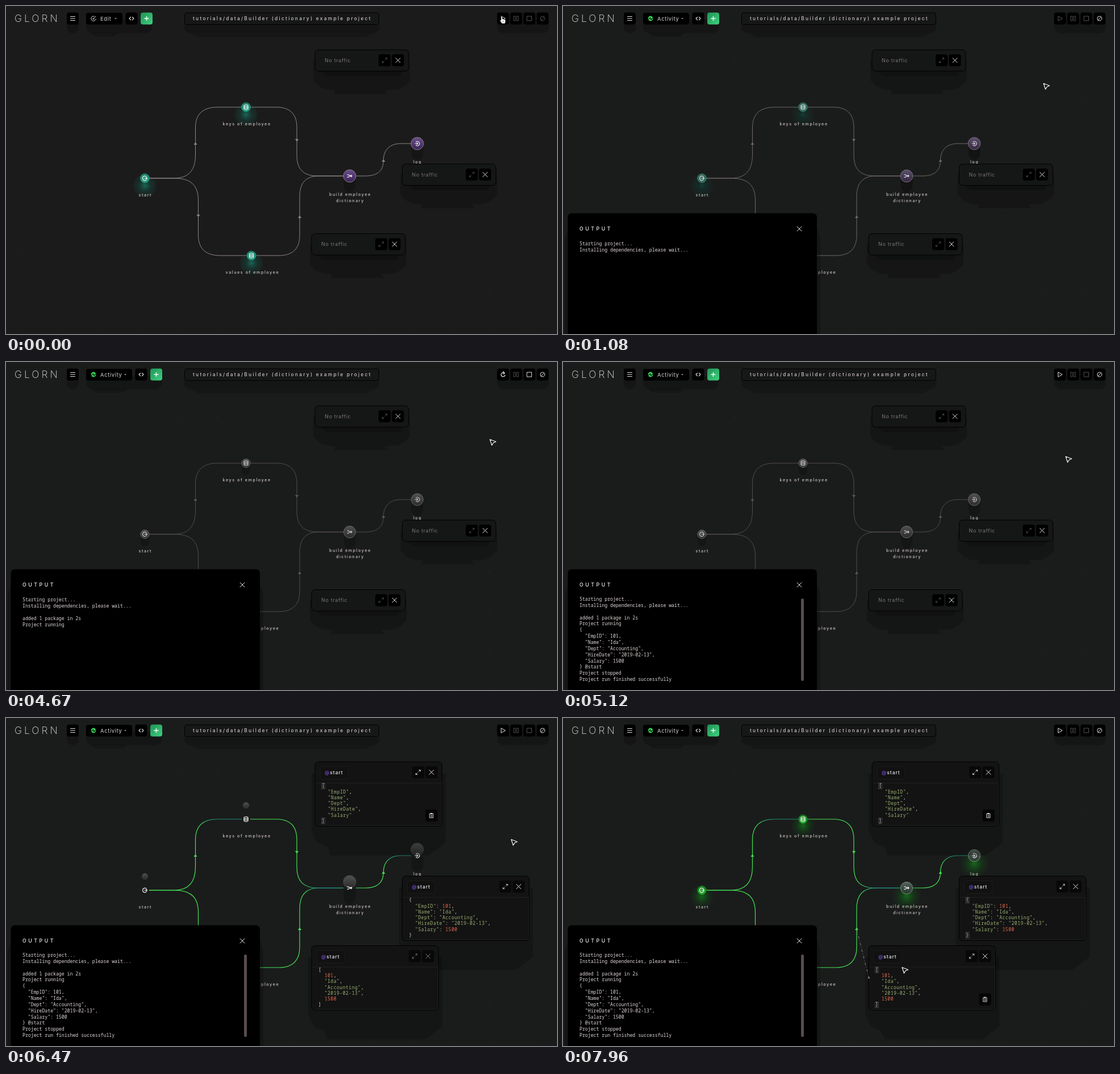
Animation of 970x577 px, one loop 8 s. Source, as an HTML page:

```html
<!DOCTYPE html>
<html lang="en">
<head>
<meta charset="utf-8">
<title>Dictionary builder</title>
<style>
  html, body { margin: 0; width: 100%; height: 100%; overflow: hidden; background: #1b1b1b; }
  svg { display: block; width: 970px; height: 577px; }
  text { font-family: Inter, "Open Sans", sans-serif; white-space: pre; }
  .logo { font-size: 17.5px; font-weight: 200; letter-spacing: 4px; fill: #e6e6e6; }
  .title { font-size: 8.4px; letter-spacing: 2.27px; fill: #d2c8c8; font-weight: 500; }
  .mode { font-size: 9.5px; letter-spacing: .6px; fill: #d6d0d0; }
  .label { font-size: 7.2px; letter-spacing: 1.55px; fill: #cdc4c4; font-weight: 500; }
  .empty { font-size: 8.8px; letter-spacing: .75px; fill: #7d7777; }
  .head { font-size: 8.8px; letter-spacing: 3.5px; fill: #eee; font-weight: 500; }
  .tag { font-size: 8.4px; letter-spacing: 1px; fill: #eee; font-weight: 500; }
  .mono { font: 8.2px "Noto Sans Mono", "DejaVu Sans Mono", monospace; fill: #e2d8d8; }
  .json { font-size: 8px; letter-spacing: .53px; fill: #ddd; }
  .str { fill: #9db274; }
  .num { fill: #e56c4c; }
  .at { fill: #7a50e0; }
  .line { fill: none; stroke: currentColor; stroke-linecap: round; stroke-linejoin: round; }
</style>
</head>
<body>
<svg id="stage" viewBox="0 0 970 577">
  <defs>
    <linearGradient id="plus" x1="0" y1="0" x2="1" y2="1"><stop stop-color="#1f9454"/><stop offset="1" stop-color="#3fd181"/></linearGradient>
    <linearGradient id="flow"><stop offset=".5" stop-color="#45e255"/><stop offset=".72" stop-color="#23897c"/></linearGradient>
    <linearGradient id="teal" x2="0" y2="1"><stop stop-color="#1c7f69"/><stop offset="1" stop-color="#25a583"/></linearGradient>
    <linearGradient id="purple" x2="0" y2="1"><stop stop-color="#69508a"/><stop offset="1" stop-color="#3b2356"/></linearGradient>
    <linearGradient id="gray" x2="0" y2="1"><stop stop-color="#505050"/><stop offset="1" stop-color="#2b2b2b"/></linearGradient>
    <linearGradient id="green" x2="0" y2="1"><stop stop-color="#137a1c"/><stop offset="1" stop-color="#22b52c"/></linearGradient>
    <linearGradient id="mist" x2="0" y2="1"><stop stop-color="#55605a"/><stop offset="1" stop-color="#28382e"/></linearGradient>
    <radialGradient id="tealGlow"><stop stop-color="#16806c" stop-opacity=".75"/><stop offset=".55" stop-color="#14604f" stop-opacity=".3"/><stop offset="1" stop-color="#14604f" stop-opacity=".12"/></radialGradient>
    <radialGradient id="greenGlow"><stop stop-color="#12801a" stop-opacity=".75"/><stop offset=".55" stop-color="#125a18" stop-opacity=".3"/><stop offset="1" stop-color="#124a16" stop-opacity="0"/></radialGradient>
  </defs>
</svg>
<script>
const LOOP = 8000;
// Moments at which the interface changes state
const RUN = 1080, IDLE = 1220, READY = 4670, DATA = 4820, STOPPED = 5120,
      LIVE = 6470, SETTLED = 6620, HOVER_LOG = 7210, HOVER_VALUES = 7360;
const BRIGHT = '#e4dede', DIM = '#565252';

const during = (from, to, content) => `<g data-from="${from}" data-to="${to}">${content}</g>`;
const at = (x, y, content, extra = '') => `<g transform="translate(${x} ${y})" ${extra}>${content}</g>`;
const text = (cls, x, y, content) => `<text class="${cls}" x="${x}" y="${y}">${content}</text>`;
const box = (x, y, w, h, fill, r = 4, stroke = 'none') =>
  `<rect x="${x}" y="${y}" width="${w}" height="${h}" rx="${r}" fill="${fill}" stroke="${stroke}"/>`;
const line = (d, width = 1) => `<path class="line" d="${d}" stroke-width="${width}"/>`;
const shade = (points, alpha = .23) => `<polygon points="${points}" fill="#000" opacity="${alpha}"/>`;

const icons = {
  menu: line('M-4 -3.5H4M-4 0H4M-4 3.5H4'),
  edit: line('M1 -4A4.2 4.2 0 1 0 4.2 1M-1 1L4 -4M-1 1H1.5'),
  activity: '<circle r="4.4" fill="#37d356"/><path d="M-4.5 1H-2L-.6 -2L1 2.4L2.2 0H4.5" fill="none" stroke="#000"/>',
  caret: '<path d="M-2 -1H2L0 1.4Z" fill="currentColor"/>',
  code: line('M-1.5 -2.5L-4 0L-1.5 2.5M1.5 -2.5L4 0L1.5 2.5', 1.2),
  plus: line('M-3.5 0H3.5M0 -3.5V3.5', 1.3),
  play: line('M-3 -4L4 0L-3 4Z'),
  pause: line('M-4 -4H-1.3V4H-4ZM1.3 -4H4V4H1.3Z', .9),
  stop: line('M-4 -4H4V4H-4Z'),
  ban: line('M4 0A4 4 0 1 1 -4 0A4 4 0 1 1 4 0M-2.8 2.8L2.8 -2.8'),
  restart: line('M2.8 -2A3.5 3.5 0 1 0 3.5 1M0 -5L2.8 -2.5L0 -.8', 1.2),
  expand: line('M1 -1L4 -4M1.6 -4H4V-1.6M-1 1L-4 4M-1.6 4H-4V1.6', .9),
  close: line('M-4 -4L4 4M4 -4L-4 4'),
  clipboard: line('M-3 -3H3V4H-3ZM-1.3 -4H1.3V-2.5H-1.3ZM-1.3 0H1.3M-1.3 2H1.3', .9),
  out: line('M2.6 -2.6A3.8 3.8 0 1 0 2.6 2.6M-.8 0H4M2.4 -1.6L4 0L2.4 1.6', 1.2),
  into: line('M-2.2 -3A3.8 3.8 0 1 1 -2.2 3M-4 0H1M-.6 -1.6L1 0L-.6 1.6', 1.1),
  merge: line('M-4 -2.4C-1 -2.4 -2 0 4 0M-4 2.4C-1 2.4 -2 0 4 0M2.4 -1.6L4 0L2.4 1.6', 1.1),
  store: line('M-3.6 -2.6A3.6 1.5 0 1 1 3.6 -2.6A3.6 1.5 0 1 1 -3.6 -2.6V2.6A3.6 1.5 0 0 0 3.6 2.6V-2.6M-3.6 0A3.6 1.5 0 0 0 3.6 0', 1.1),
};
const icon = (name, x, y, color = BRIGHT) => at(x, y, icons[name], `color="${color}"`);
const button = (name, x, y, color, fill = '#000') =>
  box(x - 10.5, y - 10.5, 21, 21, fill) + icon(name, x, y, color);

// Backdrop and grid
function backdrop() {
  let dots = '';
  for (let x = 29; x < 970; x += 68.45)
    for (let y = 97; y < 577; y += 68.2) dots += `<circle cx="${x}" cy="${y}" r="1"/>`;
  return box(0, 0, 970, 577, '#1b1b1b', 0) + during(RUN, LOOP, box(0, 0, 970, 577, '#1a1c1b', 0)) +
    `<g fill="#262626">${dots}</g>`;
}

// Connections, each with the position and direction of its arrow
const links = [
  ['M252 303H296C322 303 333.5 288 333.5 262V214C333.5 190 347 178 372 178H415', 333.5, 242, 1],
  ['M252 303H296C324 303 338.5 314 338.5 342V403C338.5 427 352 439 377 439H425', 338.5, 369, -1],
  ['M430 178H476C500 178 512 190 512 214V262C512 287 523 299 549 299H594', 512, 236, -1],
  ['M440 439H480C505 439 517 427 517 403V335C517 311 528 299 551 299H594', 517, 371, 1],
  ['M616 299H632C654 299 664.5 290 664.5 271C664.5 254 675 242 695 242H713', 664.5, 272, 1],
];
const network = (stroke, arrow, width = 1) => links.map(([d, x, y, up]) =>
  `<path d="${d}" fill="none" stroke="${stroke}" stroke-width="${width}"/>` +
  `<path d="M${x - 3} ${y + 2 * up}h6l-3 ${-4.5 * up}Z" fill="${arrow}"/>`).join('');

const nodes = [
  { x: 244.5, y: 303, r: 8, icon: 'out' },
  { x: 422.5, y: 178, r: 8, icon: 'store' },
  { x: 432, y: 439, r: 8, icon: 'store' },
  { x: 605, y: 299, r: 11, icon: 'merge' },
  { x: 724, y: 242, r: 11, icon: 'into' },
];
const ball = (r, fill, stroke) => `<circle r="${r}" fill="url(#${fill})" stroke="${stroke}"/>`;
const glow = (id, y, r) => `<circle cy="${y}" r="${r}" fill="url(#${id})"/>`;
const dropShade = r => shade(`${-r},2 ${r},2 ${r * .9},${r * 2} ${r * .4},${r * 2.6} ${-r * .4},${r * 2.6} ${-r * .9},${r * 2}`, .2);
const looks = {
  colour: n => n.r < 10
    ? glow('tealGlow', 13, 20) + ball(n.r, 'teal', '#26806c')
    : dropShade(n.r) + ball(n.r, 'purple', '#8b7d93'),
  gray: n => dropShade(n.r) + ball(n.r - .5, 'gray', '#666'),
  lifted: n => n.r < 10
    ? at(0, -24.5, ball(5, 'gray', '#444'))
    : dropShade(n.r) + at(0, -11, ball(n.r, 'gray', '#4c4c4c')),
  green: n => n.r < 10
    ? glow('greenGlow', 11, 22) + ball(n.r - .5, 'green', '#1c8a26')
    : glow('greenGlow', 14, 27) + ball(n.r - .5, 'mist', '#7d8a82'),
};
const nodeSet = look => nodes.map(n =>
  at(n.x, n.y, looks[look](n) + icon(n.icon, 0, 0, look === 'gray' ? '#c8c4c4' : '#f2f2f2'))).join('');

function graph() {
  const labels = [[233.5, 334.5, 'start'], [381.5, 209.5, 'keys of employee'], [386.5, 471, 'values of employee'],
    [569, 334, 'build employee'], [581, 344.5, 'dictionary'], [717, 277, 'log']];
  return during(0, RUN, network('#918686', '#918686') + nodeSet('colour')) +
    during(RUN, IDLE, network('#706969', '#706969') + nodeSet('gray') + `<g opacity=".5">${nodeSet('colour')}</g>`) +
    during(IDLE, LIVE, network('#514d4d', '#5c5757') + nodeSet('gray')) +
    during(LIVE, LOOP, network('url(#flow)', '#45e255', 1.2)) +
    during(LIVE, SETTLED, nodeSet('lifted')) + during(SETTLED, LOOP, nodeSet('green')) +
    labels.map(l => text('label', ...l)).join('');
}

// Traffic panels
const record = ['"EmpID": 101,', '"Name": "Ida",', '"Dept": "Accounting",', '"HireDate": "2019-02-13",', '"Salary": 1500'];
const panels = [
  { x: 544, y: 77, open: '[', close: ']', framed: LIVE, body: ['"EmpID",', '"Name",', '"Dept",', '"HireDate",', '"Salary"'] },
  { x: 697.5, y: 278, open: '{', close: '}', framed: SETTLED, body: record },
  { x: 538, y: 400.5, open: '[', close: ']', framed: SETTLED, body: record.map(l => l.split(': ')[1]) },
];
const colourise = s => s.replace(/("[^"]*")|(\d+)/g, (m, str) => `<tspan class="${str ? 'str' : 'num'}">${m}</tspan>`);

const emptyPanel = p => at(p.x, p.y,
  shade('-3,18 -3,54 8,65 20,70 36,71 33,78 128,78 122,71 146,70 157,64 167,54 167,18') +
  shade('6,36 156,36 150,46 20,46', .22) + box(0, 0, 165, 37.5, '#151616', 6, '#000') +
  text('empty', 17, 21.5, 'No traffic') + button('expand', 122.5, 18.5, DIM) + button('close', 146, 18.5, BRIGHT));

function dataPanel(p, i) {
  const controls = color => button('expand', 181.5, 18.5, color, '#080808') + button('close', 205, 18.5, color, '#080808');
  const clipboard = button('clipboard', 205, 94.5, BRIGHT, '#050505');
  const lines = [p.open, ...p.body.map(l => '  ' + l), p.close];
  const frames = box(11.7, 37.5, 5.5, 10, 'none', 0, '#4a4a4a') + box(11.7, 99, 5.5, 10, 'none', 0, '#4a4a4a');
  return at(p.x, p.y,
    shade('-6,20 -6,122 4,142 22,150 28,165 200,165 220,150 230,142 230,20') +
    box(0, 0, 223.5, 113.5, '#131313', 6, '#000') +
    `<path d="M1 37.5H222.5V107q0 5 -5 5H6" fill="none" stroke="#202020"/>` +
    box(9, 8.5, 49, 22, '#111', 4, '#1c1c1c') +
    text('tag', 17, 22.3, '<tspan class="at">@</tspan>start') +
    during(p.framed, LOOP, frames) +
    lines.map((l, k) => text('mono json', 12, 45.3 + k * 10.25, colourise(l))).join('') +
    (i < 2 ? controls(BRIGHT) : during(LIVE, HOVER_VALUES, controls('#7c7878')) + during(HOVER_VALUES, LOOP, controls(BRIGHT))) +
    [clipboard, during(HOVER_LOG, HOVER_VALUES, clipboard), during(HOVER_VALUES, LOOP, clipboard)][i]);
}
const tether = (x1, y1, x2, y2) => `<path d="M${x1} ${y1}L${x2} ${y2}" stroke="#8a8080" stroke-dasharray="5 3 1 3"/>` +
  `<circle cx="${x2}" cy="${y2}" r="1.6" fill="#8a8080"/>`;
const traffic = () => during(0, LIVE, panels.map(emptyPanel).join('')) +
  during(LIVE, LOOP, panels.map(dataPanel).join('')) +
  during(HOVER_LOG, HOVER_VALUES, tether(665, 273, 697, 335)) +
  during(HOVER_VALUES, LOOP, tether(517, 372, 538.5, 457));

// Console
function output() {
  const log = ['Starting project...', 'Installing dependencies, please wait...', '', 'added 1 package in 2s', 'Project running',
    '{', ...record.map(l => '  ' + l), '} @start', 'Project stopped', 'Project run finished successfully'];
  const print = (from, to, top) => log.slice(from, to).map((l, k) => text('mono', 29, top + (from + k) * 10.85, l)).join('');
  return during(RUN, LOOP,
    shade('3,410 9,390 447,390 453,410 453,577 3,577') + box(8.5, 364.5, 438.5, 230, '#000', 7) +
    text('head', 29, 395.2, 'OUTPUT') + icon('close', 416, 392) +
    during(RUN, STOPPED, print(0, 2, 421.2)) + during(READY, STOPPED, print(2, 5, 421.2)) +
    during(DATA, STOPPED, print(5, 12, 421.2)) +
    during(STOPPED, LOOP, print(0, 14, 420) + box(419, 416, 5, 145, '#574c4c', 2.5)));
}

// Toolbar
const barShade = (x, w) => shade(`${x},24 ${x + w},24 ${x + w},42 ${x + w - 8},48 ${x + 8},48 ${x},42`);
function modeGroup(name, iconName, width) {
  const x = 141 + width;
  return barShade(141, width + 52) + shade(`150,47 ${x - 8},47 ${x - 16},54 158,54`, .2) +
    box(141, 12, width, 20.5, '#000') + icon(iconName, 154, 22) + text('mode', 166, 25.5, name) +
    icon('caret', x - 12, 22, '#8a8585') + button('code', x + 16, 22) + button('plus', x + 42.5, 22, '#fff', 'url(#plus)');
}
function transport(...lit) {
  const row = ['play', 'pause', 'stop', 'ban'];
  if (lit.includes('restart')) row[0] = 'restart';
  return row.map((name, i) => button(name, 875 + i * 23.2, 22, lit.includes(name) ? BRIGHT : DIM)).join('');
}
const toolbar = () => text('logo', 15, 28.3, 'GLORN') + barShade(107, 21) + button('menu', 117.5, 22) +
  during(0, RUN, modeGroup('Edit', 'edit', 64)) + during(RUN, LOOP, modeGroup('Activity', 'activity', 81)) +
  barShade(314, 343) + shade('326,48 645,48 634,55 338,55', .2) +
  box(314.5, 12, 342, 20.5, '#161717', 4, '#000') +
  text('title', 329, 24.9, 'tutorials/data/Builder (dictionary) example project') +
  barShade(865, 91) +
  during(0, RUN, transport('play')) + during(RUN, READY, transport('ban')) +
  during(READY, STOPPED, transport('restart', 'stop', 'ban')) + during(STOPPED, LOOP, transport('play', 'ban'));

// Pointer stops: time, x, y of the tip
const stops = [[480, 856.5, 44.5], [630, 842, 135], [780, 845, 135], [READY, 851, 135], [DATA, 884, 163], [4970, 884, 165],
  [5270, 887, 195], [5420, 888, 210], [5720, 888, 212], [5870, 888.5, 212.5], [7060, 723, 317], [7210, 606, 421],
  [7660, 606.4, 421.3], [7960, 596, 437.5]];
const pointer = () => during(0, 480, at(869, 17.5,
    '<path d="M2.5 1.5Q4 0 5 2V5L9.5 6.3Q11 7 10.5 9.5L9.5 13.5H4L.6 8.5Q0 6.8 2.5 7.5Z" fill="#fff" stroke="#000" stroke-width=".7"/><path d="M5.2 8V11M7.2 8.3V11" stroke="#444" stroke-width=".6"/>')) +
  during(480, LOOP, '<path id="arrow" d="M1 1.2L11.5 5.2L6.8 7.2L4.4 11.5Z" fill="#111" stroke="#fff" stroke-width="1.2" stroke-linejoin="round"/>');

const stage = document.getElementById('stage');
stage.insertAdjacentHTML('beforeend', backdrop() + graph() + traffic() + output() + toolbar() + pointer());
const timed = [...stage.querySelectorAll('[data-from]')];
const arrow = document.getElementById('arrow');
const start = performance.now();

function render() {
  const t = (performance.now() - start) % LOOP;
  for (const g of timed) g.style.display = t >= +g.dataset.from && t < +g.dataset.to ? '' : 'none';
  const [, x, y] = stops.findLast(s => s[0] <= t) || stops[0];
  arrow.setAttribute('transform', `translate(${x} ${y})`);
  requestAnimationFrame(render);
}
render();
</script>
</body>
</html>
```
